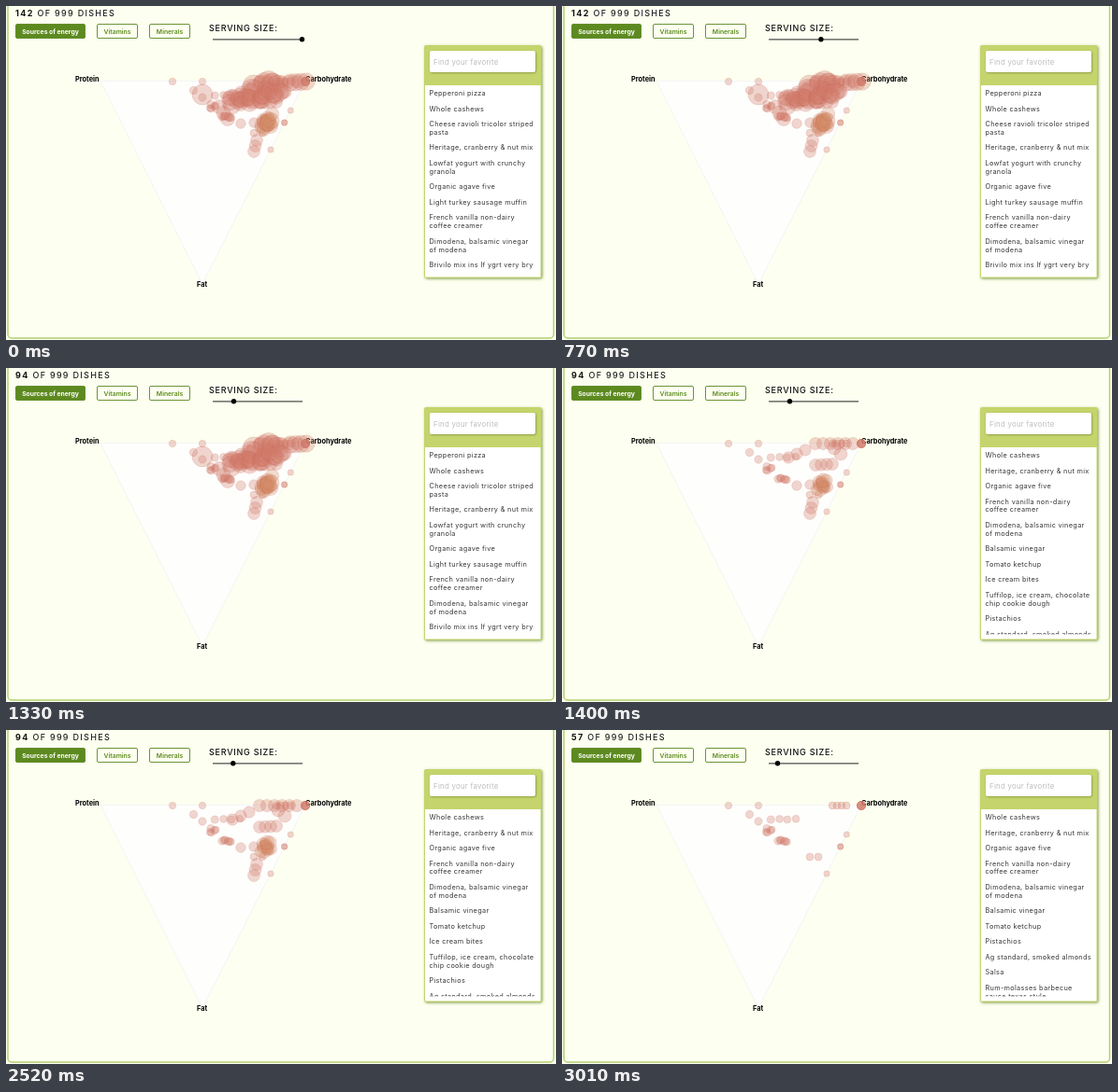
Recreate the animation shown at these times as an HTML page with a canvas. Size 588 by 358 pixels, loop 3150 ms.

```html
<!DOCTYPE html>
<html lang="en">
<head>
<meta charset="utf-8">
<title>Dish explorer</title>
<style>
  html, body { margin: 0; width: 100%; height: 100%; overflow: hidden; background: #fdfff0; }
  canvas { display: block; }
</style>
</head>
<body>
<canvas id="stage" width="588" height="358"></canvas>
<script>
const ctx = document.getElementById('stage').getContext('2d');
const LOOP = 3150, STEP = 70;
const SANS = 'Inter, Roboto, sans-serif';
const PAPER = '#fdfff0', GREEN = '#5d8a20';
const RED = '211,124,105', ORANGE = '214,142,108';
const TOP = 81;

let seed = 77;
const random = () => (seed = seed * 16807 % 2147483647) / 2147483647;
const jitter = spread => (random() * 2 - 1) * spread;

// Bubbles strung evenly between two points, scattered by spread
function string(count, [x0, y0], [x1, y1], radius, spread = 0, color = RED) {
  return Array.from({ length: count }, (_, i) => {
    const p = count > 1 ? i / (count - 1) : 0;
    return {
      x: x0 + (x1 - x0) * p + jitter(spread),
      y: Math.max(TOP, y0 + (y1 - y0) * p + jitter(spread)),
      r: radius * (1 + jitter(spread * .03)),
      color
    };
  });
}

const onRightEdge = y => ({ x: 320 - (y - TOP) * .507, y, r: 3.2, color: RED });

const smallDishes = [
  ...string(2, [178, TOP], [210, TOP], 3.7),
  ...string(4, [289, TOP], [304, TOP], 4),
  ...string(5, [320, TOP], [320, TOP], 4.6),
  ...string(2, [200.5, 90.5], [210, 98], 4.2),
  ...string(4, [224, 97], [249, 95], 4, 1),
  ...string(5, [217, 110], [224, 105], 4, 2),
  ...string(6, [231, 117], [240, 121], 4, 2),
  ...string(2, [265, 136], [274, 136], 4),
  ...[112, 125, 125, 154].map(onRightEdge)
];

const mediumDishes = [
  ...string(6, [271, TOP], [311, TOP], 6.6),
  ...string(3, [260, 88], [242, 96], 6.2),
  ...string(2, [298, 92], [291, 86], 7),
  ...string(4, [271, 104], [289, 103], 6.5),
  ...string(2, [251, 126], [265, 125], 5.3),
  ...string(3, [268, 144], [265, 156], 6.5),
  ...string(15, [273, 130], [282, 122], 6.5, 5, ORANGE)
];

const largeDishes = [
  ...string(1, [210, 95], [210, 95], 11),
  ...string(3, [228, 108], [237, 121], 7.5),
  ...string(9, [262, 86], [290, 82], 10.5, 4),
  ...string(4, [304, 82], [321, TOP], 9.2),
  ...string(30, [237, 104], [293, 91], 8.8, 5),
  ...string(9, [274, 132], [281, 119], 8, 5, ORANGE)
];

const allList = [
  ['Pepperoni pizza'], ['Whole cashews'], ['Cheese ravioli tricolor striped', 'pasta'],
  ['Heritage, cranberry & nut mix'], ['Lowfat yogurt with crunchy', 'granola'],
  ['Organic agave five'], ['Light turkey sausage muffin'],
  ['French vanilla non-dairy', 'coffee creamer'], ['Dimodena, balsamic vinegar', 'of modena'],
  ['Brivilo mix ins lf ygrt very bry']
];
const mediumList = [
  allList[1], allList[3], allList[5], allList[7], allList[8],
  ['Balsamic vinegar'], ['Tomato ketchup'], ['Ice cream bites'],
  ['Tuffilop, ice cream, chocolate', 'chip cookie dough'],
  ['Pistachios'], ['Ag standard, smoked almonds']
];
const smallList = [
  ...mediumList.slice(0, 7), ...mediumList.slice(9),
  ['Salsa'], ['Rum-molasses barbecue', 'sauce texas style']
];

function ease(t, start, end) {
  const p = Math.min(1, Math.max(0, (t - start) / (end - start)));
  return p * p * (3 - 2 * p);
}

const knobAt = t => 316 - 73 * ease(t, 490, 1020) - 13 * ease(t, 2450, 2940);

function text(str, x, y, size, color = '#000', weight = 400, spacing = 0) {
  ctx.font = `${weight} ${size}px ${SANS}`;
  ctx.letterSpacing = spacing + 'px';
  ctx.fillStyle = color;
  ctx.fillText(str, x, y);
  return ctx.measureText(str).width;
}

function roundRect(x, y, w, h, r) {
  ctx.beginPath();
  ctx.roundRect(x, y, w, h, r);
}

function circle(x, y, r) {
  ctx.beginPath();
  ctx.arc(x, y, r, 0, 2 * Math.PI);
}

function shadow(color, blur, offset) {
  ctx.shadowColor = color;
  ctx.shadowBlur = blur;
  ctx.shadowOffsetX = ctx.shadowOffsetY = offset;
}

function button(label, x, w, active) {
  roundRect(x + .5, 19.5, w - 1, 15, 1.5);
  ctx.fillStyle = active ? GREEN : PAPER;
  ctx.fill();
  ctx.strokeStyle = GREEN;
  ctx.lineWidth = .9;
  ctx.stroke();
  ctx.textAlign = 'center';
  text(label, x + w / 2, 29.5, 6.8, active ? '#fff' : GREEN, active ? 700 : 600);
  ctx.textAlign = 'left';
}

function drawHeader(count, knobX) {
  const width = text(count, 10, 11, 9, '#111', 700, 1.4);
  text(' OF 999 DISHES', 10 + width, 11, 9, '#222', 500, 1.3);
  button('Sources of energy', 10, 75, true);
  button('Vitamins', 97, 44, false);
  button('Minerals', 153, 44, false);
  text('SERVING SIZE:', 217, 27, 9, '#111', 500, .75);
  ctx.fillStyle = '#222';
  ctx.fillRect(221, 35.4, 96, 1);
  circle(knobX + .5, 35.8, 2.7);
  ctx.fillStyle = '#000';
  ctx.fill();
}

function drawChart(dishes) {
  ctx.beginPath();
  ctx.moveTo(101, 80.5);
  ctx.lineTo(320, 80.5);
  ctx.lineTo(210, 298);
  ctx.closePath();
  ctx.fillStyle = '#fefefc';
  ctx.fill();
  ctx.strokeStyle = '#f5f4f6';
  ctx.lineWidth = 1;
  ctx.stroke();
  text('Protein', 74, 81, 7.35, '#000', 700);
  text('Carbohydrate', 320, 81, 7.35, '#000', 700);
  text('Fat', 204, 301, 7.35, '#000', 700);
  ctx.lineWidth = .8;
  for (const { x, y, r, color } of dishes) {
    circle(x, y, r);
    ctx.fillStyle = `rgba(${color},.31)`;
    ctx.fill();
    ctx.strokeStyle = 'rgba(190,100,82,.22)';
    ctx.stroke();
  }
}

function drawPanel(list) {
  ctx.save();
  shadow('rgba(92,128,30,.75)', 3, 1);
  roundRect(447, 42, 125.5, 249.5, 2);
  ctx.fillStyle = '#c5d46c';
  ctx.fill();
  ctx.restore();
  ctx.fillStyle = '#fff';
  ctx.fillRect(448, 85, 123.5, 205.5);

  ctx.save();
  shadow('rgba(80,100,30,.55)', 2, .7);
  roundRect(453, 48, 113, 23, 2);
  ctx.fill();
  ctx.restore();
  text('Find your favorite', 457, 62.5, 7.8, '#bdbdbd', 400, .28);

  ctx.save();
  ctx.beginPath();
  ctx.rect(448, 85, 123, 200.5);
  ctx.clip();
  let y = 96;
  for (const lines of list) {
    lines.forEach((line, i) => text(line, 452.5, y + i * 8.9, 7.3, '#363636', 400, .33));
    y += 16.5 + (lines.length - 1) * 8.9;
  }
  ctx.restore();
}

function draw(now) {
  const t = Math.floor(now % LOOP / STEP) * STEP;
  const count = t < 1330 ? 142 : t < 2940 ? 94 : 57;
  const dishes = [...smallDishes];
  if (t < 3010) dishes.push(...mediumDishes);
  if (t < 1400) dishes.push(...largeDishes);

  ctx.fillStyle = PAPER;
  ctx.fillRect(0, 0, 588, 358);
  roundRect(2, -8, 583.5, 364, 4);
  ctx.strokeStyle = '#b4d070';
  ctx.lineWidth = 1.5;
  ctx.stroke();

  drawHeader(String(count), knobAt(t));
  drawChart(dishes);
  drawPanel(t < 1400 ? allList : t < 3010 ? mediumList : smallList);
}

const start = performance.now();
function tick() {
  draw(performance.now() - start);
  requestAnimationFrame(tick);
}
tick();
</script>
</body>
</html>
```
